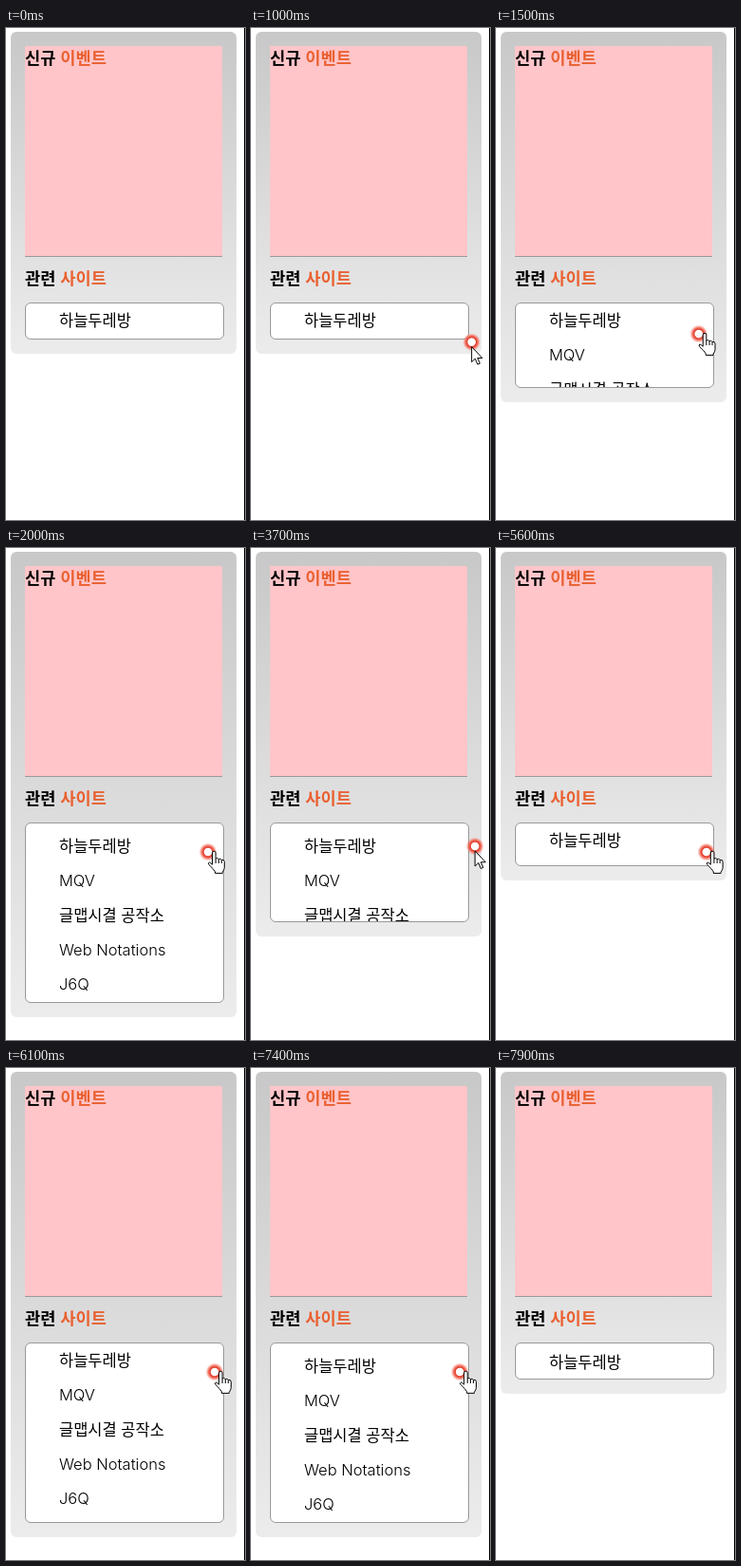
Animation of 252 by 518 pixels, one loop 8000 ms. Source, as an HTML page:

```html
<!DOCTYPE html>
<html lang="ko">
<head>
<meta charset="utf-8">
<style>
  html, body { margin: 0; width: 100%; height: 100%; overflow: hidden; background: #fff; }
  body { position: relative; }
  body > * { position: absolute; box-sizing: border-box; }
  #panel { left: 5px; top: 4px; width: 238px; border-radius: 6px;
    background: linear-gradient(#c8c8c8, #ececec); }
  #event { left: 20px; top: 19px; width: 208px; height: 222px;
    background: #ffc5c9; border-bottom: 1px solid #999; }
  h2 { left: 20px; margin: 0; white-space: nowrap; color: #000;
    font: bold 17.6px/24px "Noto Sans CJK KR", "Noto Sans CJK", sans-serif; }
  h2 span { color: #ea6030; }
  #box { left: 20px; top: 289px; width: 210px; overflow: hidden;
    background: #fff; border: 1px solid #999; border-radius: 6px; }
  #list { margin: 0; padding: 0 0 0 35px; list-style: none; white-space: nowrap; color: #000;
    font: 300 16.5px/36.25px Inter, "Noto Sans CJK KR", "Noto Sans CJK", sans-serif; }
  #edge { left: 251px; top: 0; width: 1px; height: 100%; background: #000; }
  #cursor { left: 0; top: 0; width: 1px; height: 1px; overflow: visible; }
</style>
</head>
<body>
<div id="panel"></div>
<div id="event"></div>
<h2 style="top:19px">신규 <span>이벤트</span></h2>
<h2 style="top:251px">관련 <span>사이트</span></h2>
<div id="box">
  <ul id="list">
    <li>하늘두레방</li>
    <li>MQV</li>
    <li>글맵시결 공작소</li>
    <li>Web Notations</li>
    <li>J6Q</li>
  </ul>
</div>
<div id="edge"></div>
<svg id="cursor">
  <defs>
    <radialGradient id="glow">
      <stop offset=".4" stop-color="#fff"/>
      <stop offset=".5" stop-color="#e03a28"/>
      <stop offset=".68" stop-color="#f0604e" stop-opacity=".9"/>
      <stop offset="1" stop-color="#ff8070" stop-opacity="0"/>
    </radialGradient>
  </defs>
  <circle r="9.5" fill="url(#glow)"/>
  <g fill="#fff" stroke="#000" stroke-linejoin="round">
    <path id="hand" transform="translate(-1 -2)" d="M5.5 15V3a1.8 1.8 0 0 1 3.6 0V9q1.7-1.3 3.2.6 1.7-1 3 .8 3-.6 3 2v6q0 2-2 5v1H8.5v-1.5Q7 20 2 15.5q-1.6-2 .4-2.5 1.3 0 3.1 2.5M9.1 9v5M12.3 10v4M15.3 11v3"/>
    <path id="arrow" d="M0 5v16l3.7-3.5 2.5 6 2.5-1-2.5-5.7h5z"/>
  </g>
</svg>
<script>
const $ = id => document.getElementById(id);
const LOOP = 8000, SLIDE = 500, CLOSED = 39, OPEN = 190, OFFSTAGE = 50;

// The pointer comes in from the right, rests at x and leaves again;
// the list slides open and shut, and its text settles lower while open.
const visits = [
  { enter: 200, open: 1303, arrive: 1520, leave: 3400, shut: 3430, gone: 4050,
    x: 213, rise: 17, lower: 2000, raise: 4300, settle: 1 },
  { enter: 5100, open: 5530, arrive: 5620, leave: 7400, shut: 7400, gone: 7750,
    x: 220, rise: 0, lower: 6280, raise: 7700, settle: 300 }
];

const ramp = (t, start, end) => Math.min(1, Math.max(0, (t - start) / (end - start)));
const slide = (t, start) => (1 - Math.cos(Math.PI * ramp(t, start, start + SLIDE))) / 2;

function draw(t) {
  const v = visits[t < LOOP * 0.6 ? 0 : 1];

  const open = slide(t, v.open) - slide(t, v.shut);
  const height = Math.round(CLOSED + (OPEN - CLOSED) * open);
  $("box").style.height = height + "px";
  $("panel").style.height = height + 300 + "px";

  const low = ramp(t, v.lower, v.lower + v.settle) - ramp(t, v.raise, v.raise + v.settle);
  $("list").style.transform = `translateY(${Math.round(6 * low)}px)`;

  const coming = 1 - ramp(t, v.enter, v.arrive), going = ramp(t, v.leave, v.gone);
  const x = v.x + OFFSTAGE * (coming + going);
  const y = 320 + v.rise * Math.sqrt(coming) - 13 * going;
  $("cursor").style.transform = `translate(${x}px, ${y}px)`;
  $("hand").style.display = x < 230 ? "" : "none";
  $("arrow").style.display = x < 230 ? "none" : "";
}

function tick() {
  draw(performance.now() % LOOP);
  requestAnimationFrame(tick);
}
tick();
</script>
</body>
</html>
```
